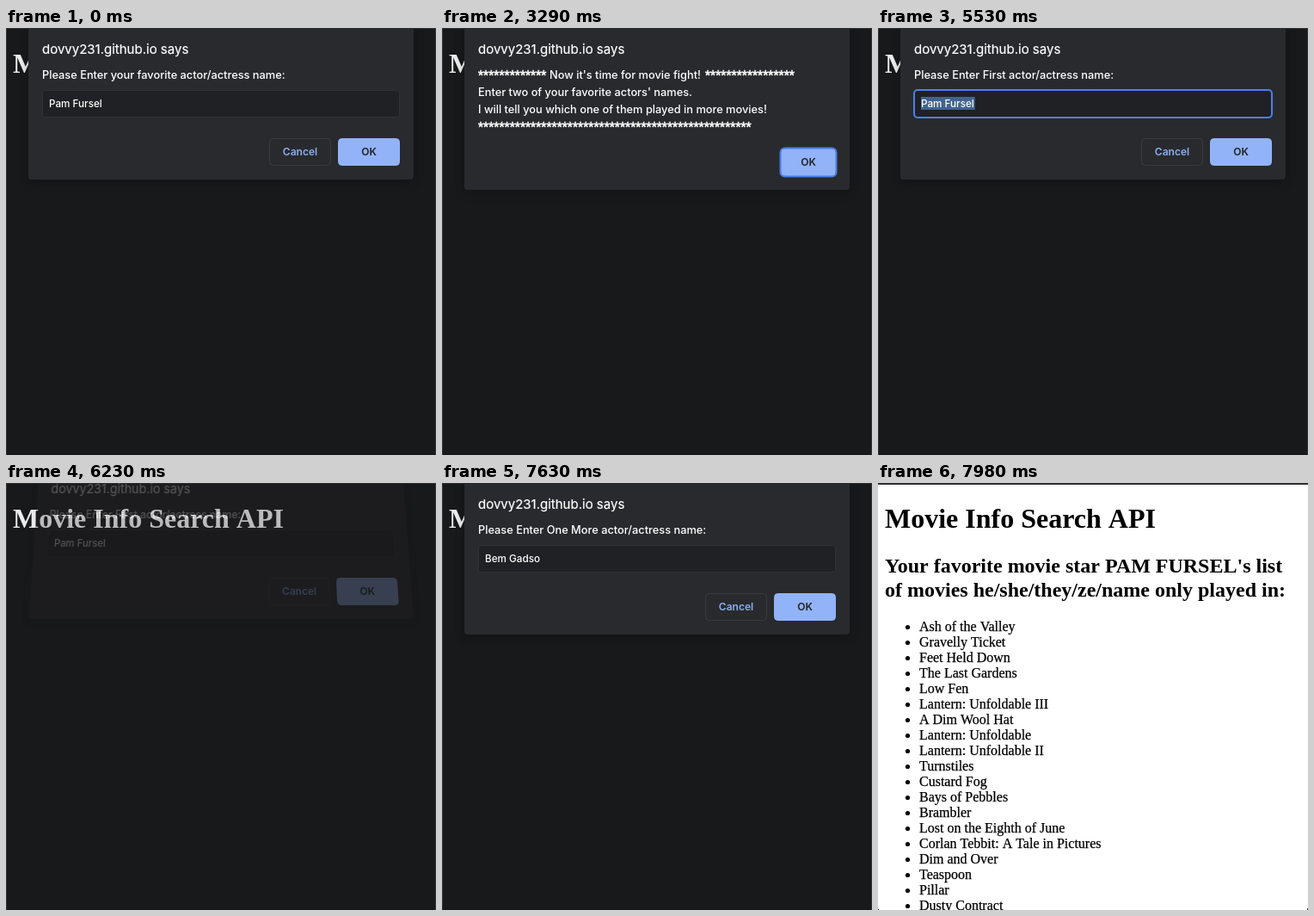
An HTML page with a canvas for the animation above (8000 ms loop, 500 px wide and 496 px high).

```html
<!DOCTYPE html>
<html lang="en">
<head>
<meta charset="utf-8">
<title>Movie Info Search API</title>
<style>
  html, body { margin: 0; width: 100%; height: 100%; overflow: hidden; background: #18191a; }
  canvas { display: block; }
</style>
</head>
<body>
<canvas id="stage" width="500" height="496"></canvas>
<script>
const W = 500, H = 496, LOOP = 8000, STEP = 70, FADE = 210;
const LIGHT_AT = 7700, LIST_AT = 7840;
const SANS = 'Inter, "Open Sans", sans-serif';
const SERIF = '"Liberation Serif", "Noto Serif", serif';
const BODY = `500 12.8px ${SANS}`;
const STARS = 'Roboto, sans-serif';

const HOST = 'dovvy231.github.io says';
const STAR = 'Pam Fursel', RIVAL = 'Bem Gadso';

const MOVIES = [
  'Ash of the Valley', 'Gravelly Ticket', 'Feet Held Down', 'The Last Gardens', 'Low Fen',
  'Lantern: Unfoldable III', 'A Dim Wool Hat', 'Lantern: Unfoldable', 'Lantern: Unfoldable II',
  'Turnstiles', 'Custard Fog', 'Bays of Pebbles', 'Brambler', 'Lost on the Eighth of June',
  'Corlan Tebbit: A Tale in Pictures', 'Dim and Over', 'Teaspoon', 'Pillar', 'Dusty Contract'
];

// Each dialog fades in from `open` and fades out from `close`, both over FADE.
const DIALOGS = [
  { open: -1000, focus: 1190, close: 1470, label: 'Please Enter your favorite actor/actress name:', value: STAR },
  { open: 1610, close: 4060, alert: true },
  { open: 4200, close: 6090, label: 'Please Enter First actor/actress name:', value: STAR },
  { open: 6230, close: 7630, label: 'Please Enter One More actor/actress name:', value: RIVAL }
];

const ctx = document.getElementById('stage').getContext('2d');
const sheet = document.createElement('canvas');
sheet.width = W;
sheet.height = 220;
const dlg = sheet.getContext('2d');

function text(c, str, x, y, font, color, { align = 'left', thicken = 0 } = {}) {
  c.font = font;
  c.fillStyle = c.strokeStyle = color;
  c.textAlign = align;
  c.fillText(str, x, y);
  if (thicken) {
    c.lineWidth = thicken;
    c.strokeText(str, x, y);
  }
}

function box(c, x, y, w, h, r, fill, stroke, line = 1) {
  c.beginPath();
  c.roundRect(x, y, w, h, r);
  if (fill) { c.fillStyle = fill; c.fill(); }
  if (stroke) { c.strokeStyle = stroke; c.lineWidth = line; c.stroke(); }
}

function button(label, x, y, w, fill, stroke, color) {
  box(dlg, x + 0.5, y + 0.5, w - 1, 31, 4, fill, stroke);
  text(dlg, label, x + w / 2, y + 20.3, `600 12px ${SANS}`, color, { align: 'center' });
}

function drawAlert(focused) {
  const line = (str, x, y) => text(dlg, str, x, y, BODY, '#fff');
  const stars = (n, x, y) => text(dlg, '*'.repeat(n), x, y, `14.2px ${STARS}`, '#fff', { thicken: 0.5 });
  stars(13, 42, 60);
  line("Now it's time for movie fight!", 125, 59);
  stars(17, 306, 60);
  line("Enter two of your favorite actors' names.", 42, 79);
  line('I will tell you which one of them played in more movies!', 42, 99);
  stars(52, 42, 119.5);
  button('OK', 394, 140, 64, '#93b3f8', '#93b3f8', '#202124');
  if (focused) box(dlg, 393.5, 139.5, 65, 33, 5, null, '#4a7de8', 2);
}

function drawPrompt(d, focused) {
  text(dlg, d.label, 42, 59, BODY, '#fff');
  box(dlg, 42.5, 72.5, 415, 31, 3, '#202124', '#313236');
  dlg.font = `500 11.7px ${SANS}`;
  if (focused) {
    box(dlg, 42, 72, 416, 32, 4, null, '#4a80ee', 2);
    dlg.fillStyle = '#42638f';
    dlg.fillRect(50, 80, dlg.measureText(d.value).width + 1, 15);
  }
  text(dlg, d.value, 50, 92.2, dlg.font, '#fff');
  button('Cancel', 306, 128, 72, null, '#393b3f', '#8ab0f6');
  button('OK', 386, 128, 72, '#93b3f8', '#93b3f8', '#202124');
}

function drawDialog(d, shown, focused) {
  const h = d.alert ? 188 : 176;
  dlg.clearRect(0, 0, W, sheet.height);
  dlg.save();
  dlg.shadowColor = 'rgba(0,0,0,.22)';
  dlg.shadowBlur = 12;
  dlg.shadowOffsetY = 4;
  box(dlg, 26, -10, 448, h + 10, 4, '#292a2d');
  dlg.restore();
  text(dlg, HOST, 42, 29.5, `15px ${SANS}`, '#fff', { thicken: 0.2 });
  if (d.alert) drawAlert(focused); else drawPrompt(d, focused);

  if (shown === 1) {
    ctx.drawImage(sheet, 0, 0);
    return;
  }
  // The sheet slides up while its top edge narrows.
  const away = 1 - shown, lift = Math.round(24 * away);
  ctx.globalAlpha = shown;
  for (let y = lift; y < sheet.height; y++) {
    const scale = 1 - 0.078 * away * Math.max(0, 1 - y / h);
    ctx.drawImage(sheet, 0, y, W, 1, W / 2 * (1 - scale), y - lift, W * scale, 1);
  }
  ctx.globalAlpha = 1;
}

function drawList() {
  const h2 = `bold 24px ${SERIF}`;
  text(ctx, `Your favorite movie star ${STAR.toUpperCase()}'s list`, 8, 104, h2, '#000');
  text(ctx, 'of movies he/she/they/ze/name only played in:', 8, 132, h2, '#000');
  MOVIES.forEach((title, i) => {
    const y = 172 + i * 18;
    text(ctx, title, 48, y, `16px ${SERIF}`, '#000', { thicken: 0.25 });
    ctx.beginPath();
    ctx.arc(34.5, y - 4.5, 2.6, 0, Math.PI * 2);
    ctx.fill();
  });
}

function drawPage(t) {
  const light = t >= LIGHT_AT;
  ctx.fillStyle = light ? '#fff' : '#18191a';
  ctx.fillRect(0, 0, W, H);
  if (!light) {
    ctx.fillStyle = '#343536';
    ctx.fillRect(0, 0, 1, H);
    ctx.fillRect(W - 1, 0, 1, H);
  }
  text(ctx, 'Movie Info Search API', 8, 52, `bold 32px ${SERIF}`, light ? '#000' : '#ededed');
  if (t >= LIST_AT) drawList();
  ctx.fillStyle = '#2f3033';
  ctx.fillRect(0, 0, W, light ? 2 : 1);
  if (light) {
    ctx.fillRect(0, H - 1, 1, 1);
    ctx.fillRect(W - 1, H - 2, 1, 2);
  }
}

const clamp = v => Math.min(1, Math.max(0, v));
const ease = v => 0.5 - 0.5 * Math.cos(Math.PI * clamp(v));

function render(now) {
  const t = Math.floor((now % LOOP) / STEP) * STEP;
  drawPage(t);
  for (const d of DIALOGS) {
    const shown = Math.min(ease((t - d.open) / FADE), 1 - ease((t - d.close) / FADE));
    const focused = shown === 1 && t >= (d.focus ?? d.open) && t < d.close;
    if (shown > 0) drawDialog(d, shown, focused);
  }
}

const start = performance.now();
function tick() {
  render(performance.now() - start);
  requestAnimationFrame(tick);
}
tick();
</script>
</body>
</html>
```
